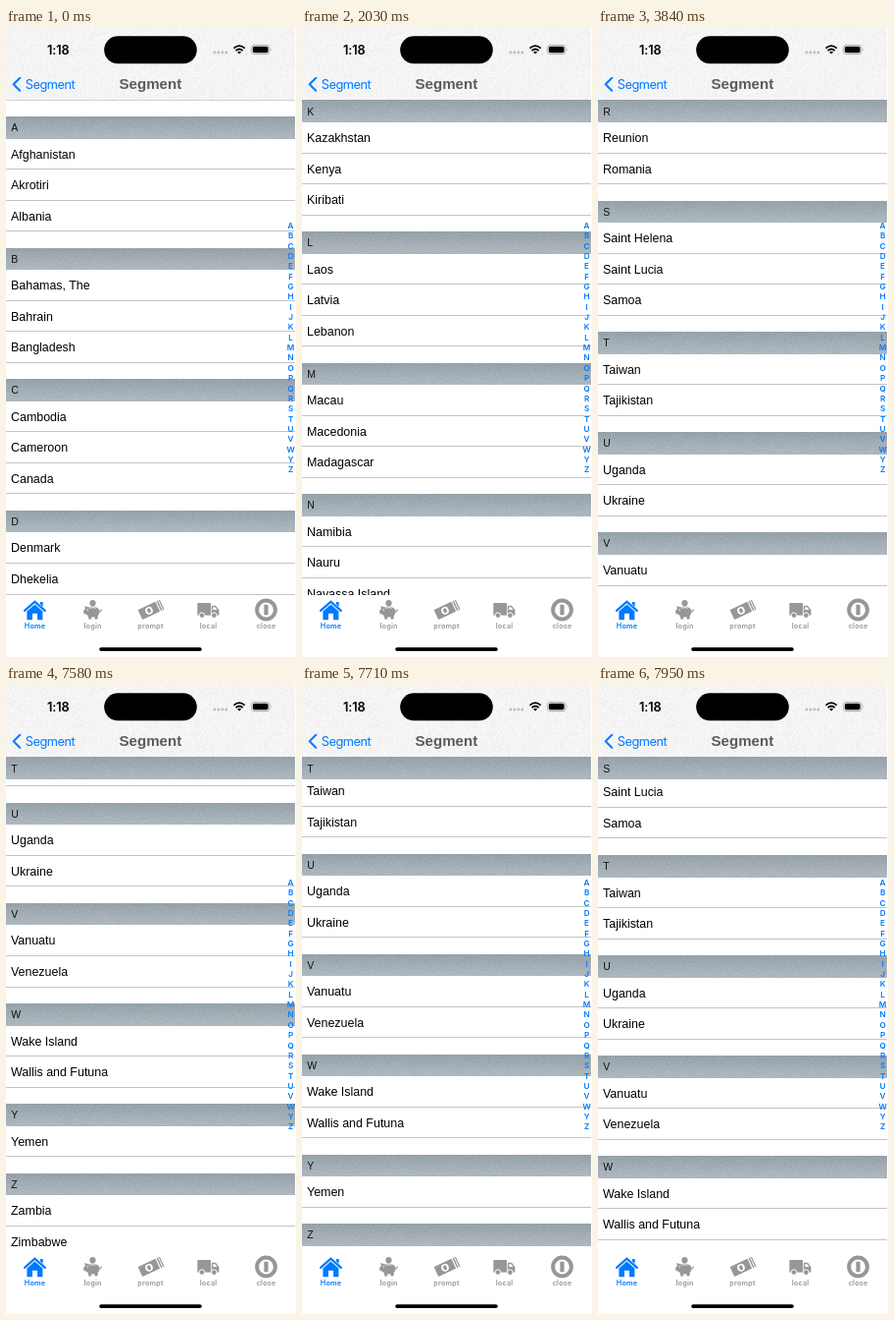
These frames come from a looping animation (296x640 px, 8 s). An HTML page with a canvas:

```html
<!DOCTYPE html>
<html lang="en">
<head>
<meta charset="utf-8">
<title>Segment</title>
<style>
  html, body { margin: 0; width: 100%; height: 100%; overflow: hidden; background: #fff; }
  #stage { position: relative; width: 296px; height: 640px; overflow: hidden; background: #fff; }
  #stage > * { position: absolute; }
  #nav { left: 0; top: 0; }
  #view { left: 0; top: 73px; width: 295px; height: 504px; overflow: hidden;
    font: 12.45px "Liberation Sans", Arial, sans-serif; color: #000; }
  #edge { position: absolute; top: 0; width: 100%; height: 1px; background: #d2d2d2; }
  #list, .section, #pin { position: absolute; left: 0; width: 100%; }
  #pin { top: 0; }
  .head { position: relative; height: 22.5px; line-height: 23px; padding-left: 5.3px;
    font-size: 10.5px; color: #111; background: linear-gradient(#95a2ab, #b0bbc3); overflow: hidden; }
  .head canvas { position: absolute; left: 0; top: 0; }
  .head span { position: relative; }
  #pin .head { height: 23px; line-height: 24.5px; }
  .row { box-sizing: border-box; height: 31.55px; line-height: 32.8px; padding-left: 5px;
    border-bottom: 1px solid #c4c4c4; white-space: nowrap; }
  #index { left: 284.6px; top: 196px; width: 12px; text-align: center; color: #007aff;
    font: 600 8.2px/10.354px Inter, Roboto, sans-serif; }
  #index div { height: 10.354px; }
  #chrome { left: 0; top: 0; }
  .ui { font-family: Inter, Roboto, sans-serif; }
  .tab { font-size: 7.3px; font-weight: 600; letter-spacing: .2px; text-anchor: middle; }
</style>
</head>
<body>
<div id="stage">
  <canvas id="nav" width="295" height="73"></canvas>
  <div id="view">
    <div id="edge"></div>
    <div id="list"></div>
    <div id="pin"></div>
  </div>
  <div id="index"></div>
  <svg id="chrome" width="296" height="640" viewBox="0 0 296 640">
    <!-- status bar -->
    <text class="ui" x="53.3" y="26.6" font-size="12.8" font-weight="600" letter-spacing="-.1" text-anchor="middle">1:18</text>
    <rect x="100.2" y="8.3" width="94.6" height="28" rx="14"/>
    <g fill="#bdbdbd">
      <rect x="211.6" y="23.5" width="2.6" height="2.8" rx=".8"/>
      <rect x="215.6" y="23.5" width="2.6" height="2.8" rx=".8"/>
      <rect x="219.6" y="23.5" width="2.6" height="2.8" rx=".8"/>
      <rect x="223.6" y="23.5" width="2.6" height="2.8" rx=".8"/>
    </g>
    <g fill="none" stroke="#000" stroke-width="1.8">
      <path d="M232.5 20.6Q238.1 15.7 243.7 20.6"/>
      <path d="M234.6 23Q238.1 20 241.6 23"/>
    </g>
    <path d="M236.1 24.4Q238.1 22.9 240.1 24.4L238.1 26.5Z"/>
    <rect x="250.4" y="17.4" width="18.6" height="9.2" rx="3" fill="none" stroke="#a5a5a5" stroke-width=".9"/>
    <rect x="251.8" y="18.8" width="15.8" height="6.4" rx="1.8"/>
    <path d="M270.2 20.5Q271.6 22 270.2 23.5Z" fill="#a5a5a5"/>

    <!-- navigation bar -->
    <path d="M14.2 50.8L7.7 57.3L14.2 63.8" fill="none" stroke="#007aff" stroke-width="2" stroke-linecap="round" stroke-linejoin="round"/>
    <text class="ui" x="19.7" y="61.7" font-size="12.8" letter-spacing="-.48" fill="#007aff">Segment</text>
    <text x="147.4" y="62.2" font-family="Liberation Sans, Arial, sans-serif" font-size="15.1" font-weight="700" text-anchor="middle" fill="#5b5b5b">Segment</text>

    <!-- tab bar -->
    <g fill="#007aff">
      <path d="M19 592.8L29.4 583.7L39.8 592.8" fill="none" stroke="#007aff" stroke-width="2.3" stroke-linecap="round"/>
      <path d="M34.9 584H37.7V588.8L34.9 586.4Z"/>
      <path d="M21.4 593.6L29.4 586.6L37.4 593.6V602.2H32V595.8H26.9V602.2H21.4Z"/>
      <text class="ui tab" x="29.6" y="611.4">Home</text>
    </g>
    <g fill="#979797">
      <circle cx="88.5" cy="585.2" r="3.1"/>
      <ellipse cx="88.5" cy="594" rx="7.2" ry="5.4"/>
      <path d="M80.4 588L85 589.7L82.5 597L79.2 595.5V592.4L80.8 591.4Z"/>
      <path d="M83.4 596H87.2V601.6H84.4ZM90.4 596H94.2L93.4 601.6H90.6Z"/>
      <path d="M95 593.4Q97.7 594 97.2 591.2" fill="none" stroke="#979797" stroke-width="1.1"/>
      <path d="M85.5 590.2Q88.5 588.9 91.5 590.2" fill="none" stroke="#fff" stroke-width=".9"/>
      <circle cx="83.4" cy="592" r=".7" fill="#fff"/>
      <text class="ui tab" x="88.6" y="611.4">login</text>

      <g transform="rotate(-25 147.5 592)">
        <rect x="135.8" y="586.6" width="19.8" height="11" rx=".8"/>
        <path d="M156.8 586.6H158.2V597.6H156.8ZM159.2 586.6H160.4V597.6H159.2Z"/>
        <circle cx="145.8" cy="592.1" r="3.8" fill="#fff"/>
        <ellipse cx="145.8" cy="592.1" rx="1.8" ry="2.5"/>
      </g>
      <text class="ui tab" x="147.6" y="611.4">prompt</text>

      <path d="M195.4 585H209V597.6H195.4Z"/>
      <path d="M209.8 587.8H214L217.4 592V597.6H209.8Z"/>
      <path d="M211.2 589.2H213.4L215.6 592H211.2Z" fill="#fff"/>
      <g stroke="#fff" stroke-width="1">
        <circle cx="200" cy="597.6" r="2.8"/>
        <circle cx="212.4" cy="597.6" r="2.8"/>
      </g>
      <text class="ui tab" x="206.6" y="611.4">local</text>

      <circle cx="265.5" cy="592" r="9.4" fill="#fff" stroke="#979797" stroke-width="4"/>
      <rect x="263.4" y="586.8" width="4.2" height="10.4" rx=".6"/>
      <text class="ui tab" x="265.6" y="611.4">close</text>
    </g>
    <rect x="95.2" y="630.2" width="104.6" height="3.8" rx="1.9"/>
  </svg>
</div>
<script>
  const LOOP = 8000, HEAD = 22.5, ROW = 31.55, GAP = 16.5, TOP = 0.5, VIEW = 505;

  const names = `Afghanistan|Akrotiri|Albania|Bahamas, The|Bahrain|Bangladesh|Cambodia|Cameroon|Canada
|Denmark|Dhekelia|Djibouti|Ecuador|Egypt|El Salvador|Faroe Islands|Fiji|Finland|Gabon|Gambia|Georgia
|Haiti|Honduras|Hungary|Iceland|India|Indonesia|Jamaica|Japan|Jordan|Kazakhstan|Kenya|Kiribati
|Laos|Latvia|Lebanon|Macau|Macedonia|Madagascar|Namibia|Nauru|Navassa Island|Oman|Pakistan|Palau|Panama
|Qatar|Reunion|Romania|Saint Helena|Saint Lucia|Samoa|Taiwan|Tajikistan|Uganda|Ukraine
|Vanuatu|Venezuela|Wake Island|Wallis and Futuna|Yemen|Zambia|Zimbabwe`.replace(/\n/g, "").split("|");

  const $ = id => document.getElementById(id);

  function add(parent, tag, cls, text) {
    const el = document.createElement(tag);
    if (cls) el.className = cls;
    if (text) el.textContent = text;
    return parent.appendChild(el);
  }

  // Paper-like texture: seeded grey speckles of the given strength.
  function grain(canvas, shade, spread, alpha) {
    const ctx = canvas.getContext("2d"), { width, height } = canvas;
    const img = ctx.createImageData(width, height);
    let seed = 7;
    for (let i = 0; i < img.data.length; i += 4) {
      seed = (seed * 1664525 + 1013904223) >>> 0;
      img.data.fill(shade + (seed / 2 ** 32 - 0.5) * spread, i, i + 3);
      img.data[i + 3] = alpha;
    }
    ctx.putImageData(img, 0, 0);
  }

  function addHead(parent, letter) {
    const head = add(parent, "div", "head"), canvas = add(head, "canvas");
    canvas.width = 295;
    canvas.height = 23;
    grain(canvas, 160, 150, 18);
    return add(head, "span", "", letter);
  }

  grain($("nav"), 244, 13, 255);

  const groups = {};
  for (const n of names) (groups[n[0]] ||= []).push(n);

  const tops = {};
  let end = 0;
  for (const letter in groups) {
    const section = add($("list"), "div", "section");
    tops[letter] = end;
    section.style.top = end + "px";
    addHead(section, letter);
    for (const n of groups[letter]) add(section, "div", "row", n);
    end += HEAD + ROW * groups[letter].length + GAP;
    add($("index"), "div", "", letter);
  }
  const pinText = addHead($("pin"), "A");
  const bottom = end - GAP - VIEW + TOP;

  function scrollAt(t) {
    if (t < 500) return -GAP;
    if (t < 2030) return tops.F;
    if (t < 3840) return tops.K;
    if (t < 5450) return tops.R;
    if (t < 7580) return bottom;
    const step = t < 7710 ? 0 : t < 7830 ? 1 : t < 7950 ? 2 : 3;
    return bottom - 4.3 - step * 51.75;
  }

  const start = performance.now();
  function draw() {
    const y = scrollAt((performance.now() - start) % LOOP);
    $("list").style.top = TOP - y + "px";
    $("pin").style.display = y < 0 ? "none" : "block";
    const current = Object.keys(tops).filter(l => tops[l] <= y).pop();
    if (current && pinText.textContent !== current) pinText.textContent = current;
    requestAnimationFrame(draw);
  }
  draw();
</script>
</body>
</html>
```
